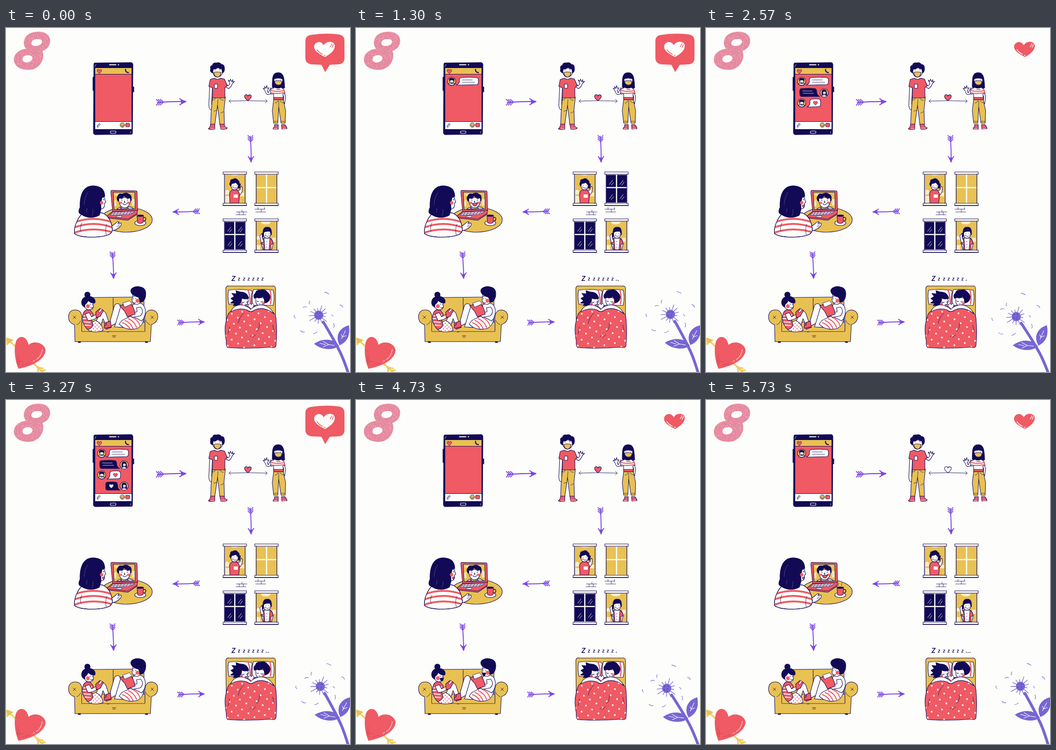
An HTML page that plays this animation: 748x748 px, repeating every 5760 ms.

```html
<!DOCTYPE html>
<html lang="en">
<head>
<meta charset="utf-8">
<title>Love story</title>
<style>
html,body{margin:0;height:100%;overflow:hidden;background:#fdfdfb}
svg{display:block;width:100vw;height:100vh;fill:none;stroke:#160c58;stroke-width:1.1;stroke-linecap:round;stroke-linejoin:round}
.w{fill:#fdfdfb}.r{fill:#ef5a64}.y{fill:#e8c152}.n{fill:#120a54}
.f{stroke:none}.sw{stroke:#fdfdfb}.sr{stroke:#ef5a64}.sy{stroke:#f0cd62}
.cheek{fill:#f0606c;stroke:none}
</style>
</head>
<body>
<svg viewBox="0 0 748 748">
<defs>
  <path id="heart" d="M0 8C-4 5-9 1-8-3C-7-8-1-8 0-3C2-8 8-7 8-3C8 2 4 5 0 8Z"/>
  <g id="arrow" stroke="#7d45e6" stroke-width="2">
    <path d="M-27 1Q0-1 28 0M17-6Q21-2 29 0Q21 3 17 6M20-2L28 0L20 2"/>
    <path d="M-29-5L-23 0L-29 6M-25-5L-19 0L-25 6M-21-5L-15 0L-21 6" stroke-width="1.7"/>
  </g>
  <g id="him">
    <circle class="y" r="9"/>
    <path class="w" d="M-7 6Q-5 3-2 4L2 4Q6 4 7 6Q0 11-7 6ZM-4-3Q-5 5 0 5Q5 5 5-3Z"/>
    <path class="n f" d="M-5 0C-8-8 0-8 2-7C7-7 6-2 5 1Q4-2 1-3Q-3-3-5 0Z"/>
    <path d="M-2 0V.3M2 0V.3M-1 2.5H1.5" stroke-width=".9"/>
  </g>
  <g id="her">
    <circle class="y" r="9"/>
    <path class="n f" d="M-5 6C-7-5-4-8 1-7C6-7 6 0 6 6Z"/>
    <path class="w" d="M-6 7Q0 2 6 7Q0 11-6 7ZM-3-2Q-3 4 0 4Q4 4 4-2Q0-4-3-2Z" stroke-width=".7"/>
    <path d="M-1 0V.3M2 0V.3M0 2H1.5" stroke-width=".9"/>
  </g>
  <g id="frame">
    <path class="w" d="M-25-36H26V-31H-25ZM-25 32H26V37H-25Z"/>
    <path d="M-22-31V32M23-31V32M-25 37H26" stroke-width="1.3"/>
  </g>
  <g id="panes">
    <path d="M-22-30H23V31H-22Z"/>
    <path class="sw" d="M.5-30V31M-22-2H23" stroke-width="2.6"/>
    <path class="glint" d="M-15-9L-8-18M-11-7L-6-13M8-9L15-18M12-7L17-14M-15 22L-8 13M-11 24L-6 18M8 22L15 13M12 24L17 18" stroke-width=".9"/>
  </g>
  <pattern id="dots" width="23" height="22" patternUnits="userSpaceOnUse" patternTransform="rotate(-12)">
    <path class="f" fill="#ef5a64" d="M0 0H23V22H0Z"/>
    <g class="w f"><circle cx="6" cy="6" r="1.9"/><circle cx="17" cy="17" r="1.9"/></g>
  </pattern>
  <pattern id="spots" width="8" height="8" patternUnits="userSpaceOnUse">
    <path class="w f" d="M0 0H8V8H0Z"/><g class="r f"><circle cx="2" cy="2" r="1.2"/><circle cx="6" cy="6" r="1.2"/></g>
  </pattern>
  <clipPath id="eightClip"><path id="eightShape" clip-rule="evenodd" d="M44 45C34 35 38 13 61 9C82 5 97 14 96 29C95 40 89 46 79 50C85 62 78 84 58 90C36 94 17 85 17 68C18 55 29 47 44 45ZM55 33C55 40 67 41 75 36C82 30 78 23 69 24C60 24 56 27 55 33ZM36 68C36 76 47 77 54 72C61 66 57 59 48 59C40 59 36 63 36 68Z"/></clipPath>
  <clipPath id="jumper"><path id="jumperShape" d="M168 402C155 412 147 434 149 447C162 457 206 457 224 449Q233 444 231 435C229 420 222 407 209 402Z"/></clipPath>
</defs>

<!-- number -->
<use href="#eightShape" fill="#e5899f" fill-rule="evenodd" stroke="none"/>
<g id="grain" clip-path="url(#eightClip)" stroke="#f3c3cc" stroke-width="1"></g>

<!-- like badge -->
<path id="badge" class="r f" d="M663 15Q694 10 724 14Q736 16 736 28V65Q736 78 723 79L704 80L694 96L686 80L664 79Q651 77 651 65V28Q651 17 663 15Z"/>
<g id="like">
  <path id="likeFill" class="f" d="M694 63C684 58 669 50 670 40C671 30 685 26 691 38C695 28 713 27 715 38C715 50 704 57 694 63Z"/>
  <path id="likeLines" d="M676 47Q681 54 688 57M692 59L694 60M709 34L705 41M712 36L709 42" stroke-width="1.5"/>
</g>

<!-- phone -->
<path class="n" d="M193 76L272 75Q276 76 276 80L275 228Q275 232 271 231L194 232Q190 231 190 227L191 80Q191 76 193 76ZM189 107H191V136H189ZM276 128H278V139H276Z"/>
<path class="r f" d="M194 101H273V203H194Z"/>
<path class="y f" d="M194 87H273V100H194Z"/>
<path class="w f" d="M194 204H273V220H194Z"/>
<path class="sw" d="M225 80H239M244 80H245" stroke-width="1.8"/>
<rect class="sw" x="227" y="224" width="12" height="5" rx="2"/>
<path class="sw" d="M193 84L196 79M271 225V229" stroke-width=".7"/>
<use href="#heart" class="r" transform="translate(203 94) scale(.62)"/>
<path d="M260 90Q259 96 266 97" stroke-width="2.4"/>
<path d="M199 214L203 208Q206 208 204 211L200 216Q197 216 198 213L202 208" stroke-width=".8"/>
<circle class="y" cx="253" cy="211" r="5" stroke-width=".8"/>
<path d="M251 210V210.3M255 210V210.3M250 212Q253 216 256 212" stroke-width=".9"/>
<rect class="r" x="260" y="207" width="9" height="8" rx="2" stroke-width=".8"/>
<g class="msg">
  <use href="#him" x="208" y="116"/>
  <path class="w" d="M228 108Q247 106 263 108Q267 109 266 115Q267 122 263 123L230 124L218 124Q225 121 225 116Q224 109 228 108Z"/>
  <path d="M231 113H253M231 118H258" stroke-width=".8"/>
</g>
<g class="msg">
  <use href="#her" x="257" y="141"/>
  <path class="n" d="M206 132Q225 130 238 132Q241 134 241 142Q243 147 247 149H208Q204 149 204 143Q203 133 206 132Z"/>
  <path class="sw" d="M210 137H231M211 142H234" stroke-width=".8"/>
</g>
<g class="msg">
  <use href="#him" x="208" y="163"/>
  <path class="w" d="M229 155Q240 153 247 155Q250 158 249 166Q249 171 245 171L220 172Q227 168 226 160Q226 156 229 155Z"/>
  <use href="#heart" class="r" transform="translate(238 163) scale(.56)"/>
</g>
<g class="msg">
  <use href="#her" x="257" y="187"/>
  <path class="n" d="M219 179Q232 177 240 179Q243 182 243 190Q244 194 248 196H220Q216 195 217 188Q216 180 219 179Z"/>
  <use href="#heart" class="w f" transform="translate(229 187) scale(.56)"/>
</g>

<!-- arrows -->
<use href="#arrow" transform="translate(359 160.5) rotate(-1) scale(1.11)"/>
<use href="#arrow" transform="translate(532.5 262.5) rotate(89)"/>
<use href="#arrow" transform="translate(392 399.5) rotate(179)"/>
<use href="#arrow" transform="translate(233 515.5) rotate(88)"/>
<use href="#arrow" transform="translate(402 639.5) rotate(-1)"/>

<!-- keeping distance -->
<g>
  <path class="w" d="M443 124L441 168Q442 178 446 178Q449 172 447 165L449 126Z"/>
  <path class="w" d="M475 126L484 132Q490 128 492 121L497 116L493 117V112L491 117L488 111L487 116L483 113L487 121L483 126L476 119Z"/>
  <path class="y" d="M449 150L446 184L445 210H454L460 168L465 210H475L474 178L477 150Z"/>
  <path d="M461 155L460 168M452 181L458 179M467 185L473 182M449 156Q454 158 455 152M465 152Q467 158 473 157" stroke-width=".8"/>
  <path class="r" d="M445 209H454V220Q443 222 440 219Q444 216 445 209ZM465 209H474Q475 215 481 217Q481 221 467 220Z"/>
  <path class="sw" d="M446 219H453M467 218H478" stroke-width=".8"/>
  <path class="r" d="M453 109L444 112L441 127L449 130V152H476V130L481 125L475 111L467 109Q460 114 453 109Z"/>
  <rect class="w" x="453" y="122" width="7" height="9" rx="1"/>
  <path class="w" d="M449 88L450 98Q453 107 460 107Q469 106 471 96L472 86Z"/>
  <path class="n" d="M449 98Q442 94 445 89Q443 82 449 81Q450 75 457 76Q465 74 468 79Q475 79 475 87Q476 94 471 98L469 89Q463 88 461 85Q457 90 451 89Z"/>
  <path class="y" d="M452 97Q460 94 467 97Q468 105 460 107Q452 105 452 97Z"/>
  <path d="M449 95L452 98M471 95L467 98M455 93V93.5M465 93V93.5M453 90L457 89M463 89L467 90" stroke-width="1"/>
</g>
<g>
  <path class="w" d="M578 133L575 143Q566 148 564 138L559 131L563 132L562 127L565 131L567 125L568 131L572 130L568 137L570 141L576 130ZM604 137L608 150L606 165L603 160L604 150L600 140Z"/>
  <path class="n" d="M579 129C579 108 579 97 592 97C606 97 605 116 606 130Q592 136 579 129Z"/>
  <path class="w" d="M583 109Q592 106 601 109Q603 125 592 125Q582 124 583 109Z"/>
  <path class="y" d="M584 116Q592 113 600 116Q600 124 592 124Q584 123 584 116Z"/>
  <path class="n f" d="M581 112Q582 101 592 101Q603 102 603 112Q592 107 581 112Z"/>
  <path d="M587 113V113.5M597 113V113.5" stroke-width="1.3"/>
  <path class="w" d="M584 129L575 134L576 144L582 143V153H603L602 143L607 142L604 133L598 129Q592 133 584 129Z"/>
  <path class="sr" d="M577 136Q591 140 605 136M577 141Q591 144 606 140M589 134H596" stroke-width="2.2"/>
  <path class="r" d="M582 151H603V156H582Z"/>
  <path class="y" d="M582 156L579 180L582 207H591L593 172L598 207H607L608 180L603 156Z"/>
  <path d="M593 158V172M582 203H591M598 203H607M585 163Q590 163 591 158M597 158Q598 164 604 162" stroke-width=".8"/>
  <path class="r" d="M584 210H592V220H581Q580 217 584 215ZM599 210H606Q611 215 611 219L600 220Z"/>
  <path class="sw" d="M582 219H590M601 219H609" stroke-width=".9"/>
</g>
<path d="M485 159Q526 157 568 159M489 155L485 159L489 163M564 155L568 159L564 163" stroke-width=".9"/>
<use id="spark" href="#heart" transform="translate(526 151) scale(.92)"/>

<!-- windows -->
<path class="y f" d="M476 318H520V381H476Z"/>
<path class="w f" d="M487 318H507Q497 323 487 318ZM477 365H488V380H477ZM477 354Q481 349 485 354V362H477ZM508 358H518V366H508Z" opacity=".72"/>
<path class="w" d="M500 355L509 352L511 344L514 346L513 357L506 367Z"/>
<path class="r" d="M493 352Q486 354 486 363L487 381H506L508 361Q505 353 501 352Z"/>
<rect class="w f" x="495" y="362" width="9" height="7"/>
<path class="w" d="M489 337Q488 352 497 352Q506 351 505 336Z"/>
<path class="n" d="M489 344Q484 340 488 335Q487 329 493 329Q500 325 504 331Q509 333 506 342Q502 340 500 335Q495 339 491 338Z"/>
<path class="n" d="M507 338L510 339L508 349L505 348Z"/>
<path d="M494 342V342.5M501 342V342.5M495 347Q498 350 501 347" stroke-width="1"/>
<circle class="cheek" cx="493" cy="346" r="1.6"/>
<use href="#frame" x="497" y="349"/>
<g id="light" transform="translate(566 349)"><use href="#panes" stroke-width=".8"/></g>
<use href="#frame" x="566" y="349"/>
<path d="M501 400H524M500 406H522M507 400V406M516 400V406M513 396V400M541 394H563M543 400H565M548 394V390M555 394V400M562 390V394" stroke-width=".8"/>
<g class="n sw" transform="translate(497 451)"><use href="#panes"/></g>
<use href="#frame" x="497" y="451"/>
<path class="y f" d="M543 420H589V483H543Z"/>
<path class="w f" d="M555 421H575Q576 427 565 427Q554 427 555 421ZM545 454Q550 449 553 455V460H545ZM579 456H586V465H579ZM545 472H553V482H545Z" opacity=".72"/>
<path class="w" d="M561 457Q555 460 555 468L559 482H578L581 469Q579 459 574 457Z"/>
<path class="r" d="M561 457Q555 460 554 469L560 471V482H563ZM574 457Q579 459 581 469L576 471V482H572Z"/>
<path class="w" d="M555 467L552 452L556 447L558 449L557 456L561 465Z"/>
<path class="w" d="M560 442Q559 457 567 457Q577 457 576 442Z"/>
<path class="n" d="M559 451Q557 432 568 433Q579 432 577 450Q575 447 574 442Q567 441 561 444Z"/>
<path class="n" d="M557 446L560 447L559 455L557 454Z"/>
<path d="M565 447V447.5M572 447V447.5M566 452Q569 455 571 452M567 464V465M567 470V471M567 476V477" stroke-width="1"/>
<circle class="cheek" cx="564" cy="451" r="1.6"/><circle class="cheek" cx="574" cy="451" r="1.5"/>
<use href="#frame" x="566" y="451"/>

<!-- video call -->
<ellipse class="y" cx="262" cy="417" rx="56" ry="27"/>
<path class="r" d="M230 353L282 354Q285 354 285 357L286 397L232 400L228 357Q228 353 230 353Z"/>
<path class="y" d="M233 357H280L281 393L235 395Z"/>
<path class="w f" d="M235 376L240 373V387L235 388ZM274 372H280V386H274ZM237 361H245V364H237Z" opacity=".6"/>
<path class="w" d="M241 394Q246 389 252 389H263Q273 388 277 393Z"/>
<path class="w" d="M245 369Q245 390 258 391Q271 390 271 368Z"/>
<path class="n" d="M244 377Q239 370 243 366Q245 359 253 361Q262 356 268 362Q274 363 272 376L270 370Q262 370 257 365Q252 371 246 370Z"/>
<path d="M252 374V375M264 374V375M250 371L254 370M262 370L266 371M258 376L257 379H259" stroke-width="1.3"/>
<circle class="cheek" cx="250" cy="380" r="2.6"/><circle class="cheek" cx="266" cy="380" r="2.6"/>
<path id="smile" d="M254 382Q259 387 263 381"/>
<path id="grin" class="r" d="M253 381Q258 383 264 380Q263 388 258 387Q254 387 253 381Z"/>
<g stroke-width=".7"><circle class="r" cx="250" cy="392" r="2"/><circle class="y" cx="257" cy="392" r="2"/><circle class="r" cx="264" cy="392" r="2"/></g>
<path class="r" d="M232 399L286 396L285 405L265 418L218 413V410Z"/>
<path class="w" d="M233 401L280 399L270 405L227 407Z" stroke-width=".7"/>
<path d="M230 404L275 402M237 401L233 407M244 401L240 407M251 400L247 406M258 400L254 406M265 400L261 405M272 399L268 405M219 411L265 415L285 403" stroke-width=".8"/>
<path class="w" d="M241 409L252 408L250 412L239 411Z" stroke-width=".7"/>
<ellipse class="w" cx="292" cy="424" rx="12" ry="5.5"/>
<path d="M299 412Q305 411 304 416Q303 420 299 420" stroke-width="1.6"/>
<path class="r" d="M285 408Q292 411 299 408L298 423Q292 427 286 423Z"/>
<ellipse class="n" cx="292" cy="408" rx="7" ry="1.8"/>
<path id="steam" d="M288 404Q286 401 289 398M295 404Q293 400 296 397" stroke-width=".7"/>
<path class="w" d="M226 433Q233 429 238 425Q243 419 246 422L243 425L250 424Q252 428 248 432Q240 440 229 441Z"/>
<path d="M243 429L248 426M241 432L247 430" stroke-width=".7"/>
<use href="#jumperShape" class="w"/>
<path class="sr" clip-path="url(#jumper)" d="M145 424Q190 406 235 424M145 435Q190 417 235 435M143 447Q190 429 240 447" stroke-width="4.2"/>
<use href="#jumperShape"/>
<path d="M219 427Q215 438 218 450M165 424Q160 435 163 442" stroke-width=".8"/>
<path class="w" d="M204 362Q213 361 214 370L217 379L214 381Q216 390 209 393L200 394Z"/>
<path class="n" d="M203 407Q183 418 163 405Q155 402 161 390C160 365 167 343 190 343C207 344 214 351 215 366Q208 366 208 374Q205 381 207 393Z"/>
<path d="M212 372V374M209 368L213 368" stroke-width="1.3"/>
<circle class="cheek" cx="208" cy="380" r="3.7"/>
<path id="talk" class="r" d="M214 384L209 386Q210 391 213 389Z" stroke-width=".8"/>
<path class="sw" d="M178 358Q170 369 170 384M189 394Q190 402 187 408M176 392L175 401" stroke-width=".5" opacity=".5"/>

<!-- sofa -->
<path class="y" d="M181 650V590Q181 586 186 586L279 585Q299 585 300 591V650Z"/>
<path d="M233 587V640"/>
<path class="y" d="M150 682L149 645Q135 641 136 626Q138 612 152 613Q164 614 165 628V658H302V630Q303 613 317 613Q330 615 330 628Q329 641 316 645L314 682Z"/>
<path class="y" d="M165 640H302V660H165Z" stroke-width=".8"/>
<path class="n" d="M157 682H162V684H157ZM303 682H308V684H303Z"/>
<path d="M146 626L152 632M152 626L146 632M315 626L321 632M321 626L315 632M154 645Q160 643 162 637M313 645Q306 642 304 636M231 669H239M232 672H238M220 661H224" stroke-width=".9"/>
<!-- reader, left -->
<path class="w" d="M186 655L207 617Q213 613 217 620L225 644L218 648L211 632L202 660Z"/>
<path class="r" d="M214 642L225 638L229 651L218 655L214 649Z"/>
<path d="M177 653Q184 639 195 636Q209 642 211 658Q194 664 180 658Z" fill="url(#spots)"/>
<path class="r" d="M174 613Q166 618 166 632Q168 648 178 656Q188 652 189 646L186 634L190 622L183 613Z"/>
<path class="sw" d="M169 626L187 624M167 632L174 632M169 639L183 640M172 646L184 647" stroke-width="1.8"/>
<path class="w" d="M172 622L178 636Q188 636 198 630L203 624L199 621L186 628L181 619Z"/>
<path class="r" d="M195 618L204 610L212 614L205 627L196 630Z"/>
<path class="w" d="M201 617L206 610L209 612L204 619Z" stroke-width=".8"/>
<path class="w" d="M173 594L171 606Q175 615 185 612Q191 610 190 602L188 592Z"/>
<path class="n" d="M171 607C160 603 163 585 176 584C189 581 197 592 193 598Q183 599 179 592Q176 599 172 601Z"/>
<circle class="n" cx="177" cy="580" r="6"/>
<circle class="cheek" cx="178" cy="605" r="4.2"/>
<path d="M188 601V602M183 600V601" stroke-width="1.3"/>
<!-- reader, right -->
<path class="w" d="M262 650L237 643L228 648Q222 644 226 638L236 603Q242 596 248 602L262 629L270 640Z"/>
<path class="w" d="M236 650L249 607L255 600L266 630L284 642L272 652Z"/>
<path class="w" d="M270 627L252 636L246 644L255 651Q270 658 286 653Q296 648 299 635L284 624Z"/>
<path class="sr" d="M253 641Q262 643 269 653M259 636Q271 641 276 653M266 632Q279 638 284 651M274 629Q287 634 291 647" stroke-width="2.2"/>
<path class="r" d="M218 640L227 637L229 650L214 653Q211 648 218 645Z"/>
<path class="w" d="M276 601Q273 614 277 628L295 637Q304 628 303 613Q301 600 291 598Z"/>
<path class="w" d="M293 607Q301 617 292 626L275 629L268 624L272 620L285 617L284 608Z"/>
<path class="r" d="M247 604L268 598Q277 602 281 622L264 628L258 616Z"/>
<path class="w" d="M254 598L269 593L274 600L258 607Z" stroke-width=".8"/>
<path class="w" d="M276 579L274 592Q275 601 285 601Q295 599 296 584Z"/>
<path class="n" d="M290 596Q291 588 287 585Q279 583 275 579Q268 572 274 566Q283 560 292 563Q304 565 304 578Q304 591 296 596Z"/>
<circle class="cheek" cx="286" cy="593" r="4.3"/>
<path d="M277 588V589M282 588V589M276 584H279" stroke-width="1.2"/>
<path id="calm" d="M184 608Q187 610 189 607M277 596Q279 599 282 597"/>
<path id="laugh" class="n" d="M183 605L190 604Q190 611 186 611Q183 610 183 605ZM275 593L282 594Q281 600 278 600Q275 598 275 593Z"/>

<!-- bed -->
<path class="y" d="M479 655L478 567Q478 560 486 561H579Q587 560 586 569V655Z"/>
<path class="w" d="M484 570Q506 567 532 570Q537 572 534 579L533 601H485Q481 585 484 570ZM538 569Q560 567 581 570Q585 584 581 603H536Q534 580 538 569Z"/>
<path class="sr" d="M526 570Q531 580 531 598M574 570Q578 585 575 600" stroke-width="2.6"/>
<path class="w" d="M504 588Q504 604 515 605Q526 604 527 592L521 581Z"/>
<path class="n" d="M505 603L494 604L497 599L488 598L495 593L489 588L496 584L491 577L501 578L500 571L509 574Q524 573 528 588Q517 591 512 587Q514 596 505 603Z"/>
<path class="w" d="M544 584Q540 602 551 604Q562 602 564 588Z"/>
<path class="n" d="M540 588Q537 581 542 577Q544 569 553 570Q564 567 569 575Q578 583 572 593Q567 598 562 598Q563 589 558 584Q552 589 546 586Z"/>
<path d="M513 596Q516 598 518 596M522 596Q525 597 526 594M545 593Q547 596 549 594M554 595Q557 597 559 594M519 601H522M550 600H553"/>
<circle class="cheek" cx="512" cy="600" r="3"/><circle class="cheek" cx="560" cy="599" r="3"/>
<path d="M481 628Q484 613 505 609Q534 599 563 609Q583 613 587 630Q590 661 587 691Q585 697 575 694Q530 698 483 695Q478 694 479 681Q474 655 478 640Z" fill="url(#dots)"/>
<path class="w" d="M489 617Q494 603 511 602Q525 604 532 612Q540 603 555 602Q574 604 582 621Q560 604 541 613Q532 620 524 613Q507 607 489 617Z"/>
<path class="w" d="M526 604L531 598L533 602L537 598L539 604L534 611Z" stroke-width=".8"/>
<path d="M517 620Q507 629 505 642M551 641Q552 653 545 660M531 671L536 667M536 673L543 667M486 650L483 665M580 646L583 660" stroke-width=".8"/>
<g id="snore" class="n f" font-family="Inter, 'DejaVu Sans', sans-serif" font-style="italic" font-weight="600" font-size="9.5">
  <text x="490" y="550" font-size="14">Z</text>
  <text x="504 515 525 535 545 555" y="549">zzzzzz</text>
</g>
<g class="n f"><circle class="dot" cx="566" cy="548.5" r="1"/><circle class="dot" cx="570" cy="549" r="1"/><circle class="dot" cx="574" cy="549" r="1"/></g>

<!-- struck heart -->
<path class="sy" d="M5 678L84 752M3 688L2 675L14 679M68 738L80 740M70 748L69 736M75 745L85 744" stroke-width="3.4"/>
<path class="y f" d="M1 674L15 679L5 687Z"/>
<path class="r f" d="M27 741C19 722 17 699 21 684C25 668 44 666 49 689C60 679 83 684 86 700C86 719 60 735 27 741Z"/>
<path d="M79 699Q77 714 66 721M59 725L62 723" stroke="#f8adb0" stroke-width="2"/>
<path d="M27 711L24 729M29 718L28 732M24 724L38 726M36 733L52 728" stroke="#d8434f" stroke-width="1"/>

<!-- dandelion -->
<g id="flower" stroke="#7865d4">
  <path d="M691 639Q715 680 723 697Q733 715 746 756" stroke-width="6"/>
  <path fill="#7865d4" d="M724 691C713 675 690 674 671 686C686 699 711 701 724 691ZM726 689C716 668 727 652 746 647C749 668 742 682 726 689Z"/>
  <path class="sw" d="M683 685L695 688M690 681L702 688L715 690M690 693L702 688M730 676L739 658M730 666L732 672L740 669" stroke-width="1.1"/>
  <circle cx="681" cy="624" r="9.5" fill="#7865d4" stroke-width="1"/>
  <path id="rays" stroke-width="1.3"/>
  <path d="M676 620L678 619M683 618L685 620M675 626L677 628M682 626L684 625M681 630H683" stroke="#4e3db0" stroke-width="1.2"/>
  <path d="M694 574Q700 575 703 578M727 602Q733 603 733 608M662 593Q659 597 661 600M655 606Q650 604 647 607M628 624Q627 628 630 630M641 657Q645 662 650 660M669 664Q674 664 677 660M713 642Q716 648 713 651M709 623L712 627" stroke-width="1.1"/>
</g>
</svg>
<script>
const $ = id => document.getElementById(id);
const all = name => [...document.querySelectorAll('.' + name)];
const show = (el, on) => { el.style.display = on ? '' : 'none'; };
const svgPath = d => {
  const p = document.createElementNS('http://www.w3.org/2000/svg', 'path');
  p.setAttribute('d', d);
  return p;
};

let seed = 8;
const rnd = () => (seed = seed * 16807 % 2147483647) / 2147483647;
let specks = '';
for (let i = 0; i < 650; i++) specks += `M${(16 + rnd() * 82).toFixed(1)} ${(7 + rnd() * 86).toFixed(1)}h.1`;
$('grain').append(svgPath(specks));

let rays = '';
for (let i = 0; i < 13; i++) {
  const a = i * Math.PI * 2 / 13 + .2, len = 15 + i * 7 % 9;
  rays += `M${681 + 9 * Math.cos(a)} ${624 + 9 * Math.sin(a)}L${681 + len * Math.cos(a)} ${624 + len * Math.sin(a)}`;
}
$('rays').setAttribute('d', rays);

const messages = all('msg'), dots = all('dot');

function draw(t) {
  const sent = Math.min(4, Math.floor(t % 4400 / 800));
  messages.forEach((m, i) => show(m, i < sent));

  const badge = t % 1000 < 500;
  show($('badge'), badge);
  $('likeFill').setAttribute('class', badge ? 'w f' : 'r f');
  $('likeLines').setAttribute('class', badge ? 'sr' : 'sw');

  const trail = Math.floor(t % 2000 / 500);
  dots.forEach((d, i) => show(d, i < trail));

  const dark = t % 3000 > 500 && t % 3000 < 1500;
  $('light').setAttribute('class', dark ? 'n sw' : 'y sy');
  $('spark').setAttribute('class', t % 3000 > 2600 ? 'w' : 'r');

  const grin = t % 4000 > 1300 && t % 4000 < 2000;
  show($('grin'), grin);
  show($('smile'), !grin);
  show($('talk'), t > 2100);
  show($('steam'), t % 2000 > 1600);

  const laugh = t > 4000 && t < 5000;
  show($('laugh'), laugh);
  show($('calm'), !laugh);

  const sway = 2.4 * Math.cos((t - 1520) * Math.PI / 1000) - .6;
  $('flower').setAttribute('transform', `rotate(${sway.toFixed(3)} 745 748)`);
}

const start = performance.now();
function tick() {
  draw((performance.now() - start) % 5760);
  requestAnimationFrame(tick);
}
tick();
</script>
</body>
</html>
```
